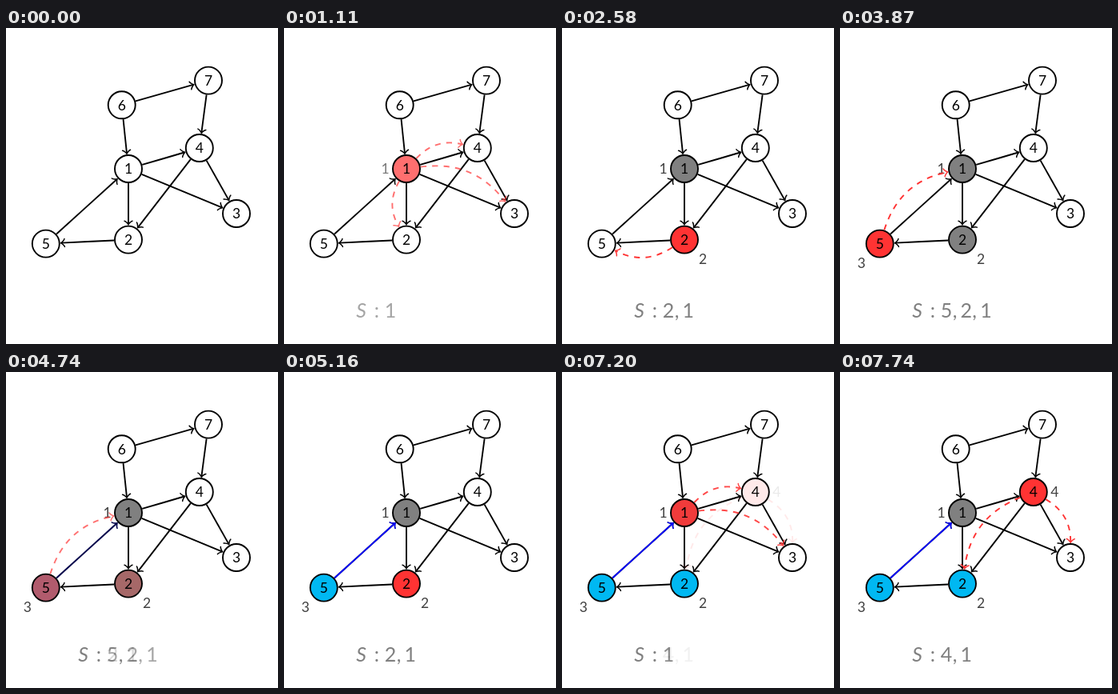
Write an HTML page with a canvas that moves like this. It is 340 px wide and 395 px high and loops after 8 s.

```html
<!DOCTYPE html>
<html lang="en">
<head>
<meta charset="utf-8">
<title>Depth-first search</title>
<style>
html, body { margin: 0; width: 100%; height: 100%; overflow: hidden; background: #fff; }
canvas { display: block; width: 340px; height: 395px; }
</style>
</head>
<body>
<canvas id="stage"></canvas>
<script>
const W = 340, H = 395, LOOP = 8000, HOLD = 750, PERIOD = 1290, STEP = 60, STEPS = 10;
const RED = '#ff3333', GRAY = '#808080', CYAN = '#00b8f2', BLUE = '#0000ff', BLACK = '#000';
const R = 17, LINE = 1.9, BEND = Math.PI / 6;
const FONT = 'Lato, "Open Sans", sans-serif';

const nodes = {
  1: [153, 176], 2: [153, 264.6], 3: [288, 232], 4: [241.8, 150],
  5: [49.8, 269.6], 6: [144.7, 96.3], 7: [253, 65.6]
};
const edges = ['67', '61', '74', '14', '13', '12', '43', '42', '25', '51'];
// Visit-order labels, in the order they appear
const labels = [['1', 126.5, 176], ['2', 176, 289], ['3', 26.7, 294], ['4', 268.3, 150]];

// arcs: edge -> bend side (-1 left, 1 right)
const states = [
  { fill: {}, arcs: {}, seen: 0 },
  { fill: { 1: RED }, arcs: { 14: -1, 13: -1, 12: 1 }, seen: 1, stack: '1' },
  { fill: { 1: GRAY, 2: RED }, arcs: { 25: -1 }, seen: 2, stack: '21' },
  { fill: { 1: GRAY, 2: GRAY, 5: RED }, arcs: { 51: -1 }, seen: 3, stack: '521' },
  { fill: { 1: GRAY, 2: RED, 5: CYAN }, arcs: {}, seen: 3, stack: '21', back: true },
  { fill: { 1: RED, 2: CYAN, 5: CYAN }, arcs: { 14: -1, 13: -1 }, seen: 3, stack: '1', back: true },
  { fill: { 1: GRAY, 2: CYAN, 5: CYAN, 4: RED }, arcs: { 42: 1, 43: -1 }, seen: 4, stack: '41', back: true }
];

const dpr = window.devicePixelRatio || 1;

function setup(canvas) {
  canvas.width = W * dpr;
  canvas.height = H * dpr;
  const c = canvas.getContext('2d');
  c.scale(dpr, dpr);
  return c;
}

function polar([x, y], r, a) {
  return [x + r * Math.cos(a), y + r * Math.sin(a)];
}

function arrowHead(c, [x, y], angle) {
  const a = 1.25;
  c.save();
  c.translate(x, y);
  c.rotate(angle);
  c.setLineDash([]);
  c.lineWidth = LINE * 0.8;
  c.lineCap = c.lineJoin = 'round';
  c.beginPath();
  c.moveTo(-3 * a, 4 * a);
  c.bezierCurveTo(-2.75 * a, 2.5 * a, 0, 0.25 * a, 0.75 * a, 0);
  c.bezierCurveTo(0, -0.25 * a, -2.75 * a, -2.5 * a, -3 * a, -4 * a);
  c.stroke();
  c.restore();
}

function arrow(c, edge, color, side = 0) {
  const from = nodes[edge[0]], to = nodes[edge[1]];
  const dir = Math.atan2(to[1] - from[1], to[0] - from[0]);
  const out = dir + side * BEND, into = dir + Math.PI - side * BEND;
  const p = polar(from, R + 0.95, out), q = polar(to, R + 2.65, into);
  const reach = 0.3915 * Math.hypot(q[0] - p[0], q[1] - p[1]);
  c.strokeStyle = color;
  c.lineWidth = LINE;
  c.setLineDash(side ? [7.2, 7.2] : []);
  c.beginPath();
  c.moveTo(...p);
  c.bezierCurveTo(...polar(p, reach, out), ...polar(q, reach, into), ...q);
  c.stroke();
  c.setLineDash([]);
  arrowHead(c, q, into + Math.PI);
}

function text(c, s, x, y, size, color, style = '') {
  c.font = `${style} ${size}px ${FONT}`;
  c.fillStyle = color;
  c.fillText(s, x, y);
}

function drawStack(c, stack) {
  const y = 362.3;
  text(c, 'S', 96.5, y, 25, GRAY, 'italic');
  text(c, ':', 116, y, 25, GRAY);
  [...stack].forEach((d, i) => {
    const x = 133 + i * 24.7;
    text(c, d, x, y, 25, GRAY);
    if (i < stack.length - 1) text(c, ',', x + 10.5, y, 25, GRAY);
  });
}

function drawState(c, s) {
  c.fillStyle = '#fff';
  c.fillRect(0, 0, W, H);
  c.textAlign = 'center';
  edges.forEach(e => arrow(c, e, BLACK));
  if (s.back) arrow(c, '51', BLUE);
  for (const id in nodes) {
    const [x, y] = nodes[id];
    c.beginPath();
    c.arc(x, y, R, 0, 2 * Math.PI);
    c.fillStyle = s.fill[id] || '#fff';
    c.fill();
    c.strokeStyle = BLACK;
    c.lineWidth = LINE;
    c.stroke();
    text(c, id, x, y + 6.3, 17.5, BLACK);
  }
  labels.slice(0, s.seen).forEach(([d, x, y]) => text(c, d, x, y + 6.3, 17.5, '#404040'));
  for (const e in s.arcs) arrow(c, e, RED, s.arcs[e]);
  if (s.stack) drawStack(c, s.stack);
}

const ctx = setup(document.getElementById('stage'));
const layers = states.map(s => {
  const canvas = document.createElement('canvas');
  drawState(setup(canvas), s);
  return canvas;
});

function show(layer, alpha) {
  ctx.globalAlpha = alpha;
  ctx.drawImage(layer, 0, 0, W, H);
}

function render(t) {
  const p = t - HOLD;
  if (p < 0) return show(layers[0], 1);
  const i = Math.floor(p / PERIOD);
  const k = Math.min(STEPS, Math.floor((p % PERIOD) / STEP) + 1);
  show(layers[i], 1);
  show(layers[i + 1], k / STEPS);
}

const start = performance.now();
function tick() {
  render((performance.now() - start) % LOOP);
  requestAnimationFrame(tick);
}
tick();
</script>
</body>
</html>
```
